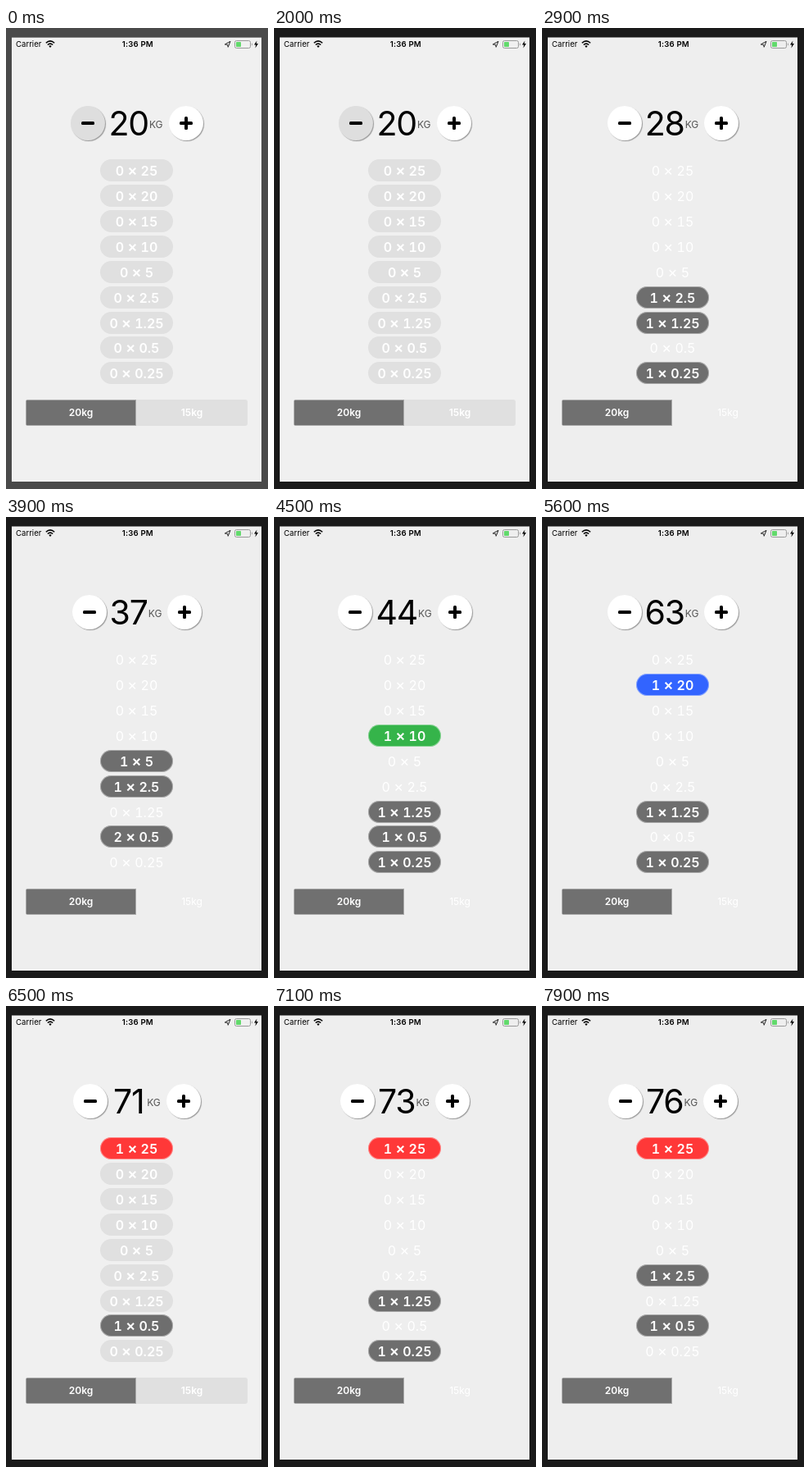
Animation of 320 by 562 pixels, one loop 8000 ms. Source, as an HTML page:

```html
<!DOCTYPE html>
<html lang="en">
<head>
<meta charset="utf-8">
<title>Barbell plate counter</title>
<style>
  html, body { margin: 0; width: 100%; height: 100%; overflow: hidden; }
  body { position: relative; background: #4a4a4a; font-family: Inter, Roboto, sans-serif; animation: frame 8s step-end infinite; }
  @keyframes frame { 0% { background: #4a4a4a; } 25%, 100% { background: #1a1a1a; } }
  #screen { position: absolute; left: 7px; top: 11px; width: 305px; height: 542px; background: #f0f0f0; box-shadow: inset 0 1px #858585; --off: #e0e0e0; --weight: 600; }
  #screen.faint { background: #eee; --off: transparent; --weight: 400; }
  #status { position: absolute; left: 0; top: 0; }
  #total { position: absolute; left: 0; top: 84px; width: 306px; height: 42px; display: flex; justify-content: center; align-items: center; }
  #weight { min-width: 43px; margin-left: 4px; font-size: 41px; line-height: 42px; letter-spacing: -1.2px; text-align: center; color: #000; }
  #unit { margin: 3px 7px 0 1px; font-size: 12px; color: #555; }
  .button { position: relative; flex: none; width: 42px; height: 42px; border-radius: 50%; background: #fff; box-shadow: 1px 1px 1px #999; }
  .button.disabled { background: #dedede; }
  .button::before, .plus::after { content: ""; position: absolute; left: 13px; top: 19px; width: 16px; height: 4px; border-radius: 1.5px; background: #000; }
  .plus::after { transform: rotate(90deg); }
  .plate { position: absolute; left: 108px; width: 89px; height: 27px; border-radius: 14px; background: var(--off); color: #fff; font: var(--weight) 16px/28px Inter, Roboto, sans-serif; font-variant-numeric: tabular-nums; text-align: center; white-space: pre; }
  .plate span { font-size: 1.15em; line-height: 0; }
  .plate.on { background: var(--on); color: var(--ink); font-weight: 600; box-shadow: inset 0 0 0 1px #fff6; }
  #bars { position: absolute; left: 17px; top: 442px; width: 271px; height: 32px; display: flex; border-radius: 3px; overflow: hidden; color: #fff; font-size: 12px; line-height: 32px; text-align: center; }
  #bars div { flex: 1; background: var(--off); font-weight: var(--weight); }
  #bars .chosen { flex: none; width: 135px; background: #707070; box-shadow: inset 0 0 0 1px #fff6; font-weight: 600; }
</style>
</head>
<body>
<div id="screen">
  <svg id="status" width="305" height="20" viewBox="7 11 305 20">
    <g font-family="Inter, Roboto, sans-serif" font-size="9.6">
      <text x="12" y="23.2">Carrier</text>
      <text x="160.8" y="23.2" text-anchor="middle" font-weight="600" letter-spacing=".2">1:36 PM</text>
    </g>
    <path d="M48.8 18.2Q54 13.6 59.2 18.2M50.8 20.5Q54 17.7 57.2 20.5" fill="none" stroke="#000" stroke-width="1.5"/>
    <path d="M52.3 22L54 24L55.7 22Q54 20.6 52.3 22Z"/>
    <path d="M267.3 20L274 16.3L271.2 23.3L270.6 20.3Z" fill="none" stroke="#222"/>
    <rect x="279.5" y="15.5" width="19" height="9" rx="2" fill="none" stroke="#999"/>
    <rect x="281" y="17" width="6" height="6" rx=".7" fill="#62d96c"/>
    <path d="M300 18.3Q302 20 300 21.7Z" fill="#999"/>
    <path d="M306.4 15.5L303 20.6H305.2L304.4 24.4L308 19.1H305.7Z"/>
  </svg>
  <div id="total">
    <div id="minus" class="button"></div>
    <span id="weight">20</span><span id="unit">KG</span>
    <div class="button plus"></div>
  </div>
  <div id="plates"></div>
  <div id="bars"><div class="chosen">20kg</div><div>15kg</div></div>
</div>
<script>
  const LOOP = 8000, TICK = 100, BAR = 20;
  const SIZES = [25, 20, 15, 10, 5, 2.5, 1.25, 0.5, 0.25];
  const COLORS = { 25: "#ff3838", 20: "#3264ff", 15: "#ffff00", 10: "#35b44a" };
  // [time, weight]: a held press that speeds up, then single taps
  const RAMP = [[0, 20], [2000, 20], [2900, 28], [3900, 37], [4300, 42], [4400, 42], [4900, 52], [6000, 70], [6400, 70]];
  const TAPS = [6500, 6700, 7000, 7200, 7700, 7900];

  const byId = id => document.getElementById(id);
  const screenBox = byId("screen");
  const pills = SIZES.map((size, i) => {
    const pill = document.createElement("div");
    pill.className = "plate";
    pill.style.top = 149.3 + i * 30.87 + "px";
    pill.style.setProperty("--on", COLORS[size] || "#6e6e6e");
    pill.style.setProperty("--ink", size === 15 ? "#5a5a5a" : "#fff");
    byId("plates").append(pill);
    return pill;
  });

  function weightAt(time) {
    const next = RAMP.findIndex(([at]) => at > time);
    if (next < 0) return 70 + TAPS.filter(at => at <= time).length;
    const [t0, w0] = RAMP[next - 1], [t1, w1] = RAMP[next];
    return Math.round(w0 + (w1 - w0) * (time - t0) / (t1 - t0));
  }

  function show(weight) {
    let side = (weight - BAR) / 2, lit = 0;
    SIZES.forEach((size, i) => {
      const count = Math.floor(side / size);
      side -= count * size;
      lit += count > 0;
      pills[i].innerHTML = `${count} <span>×</span> ${size}`;
      pills[i].classList.toggle("on", count > 0);
    });
    byId("weight").textContent = weight;
    byId("minus").classList.toggle("disabled", weight === BAR);
    screenBox.classList.toggle("faint", lit > 2);
  }

  let shown;
  function draw() {
    const time = performance.now() % LOOP;
    const weight = weightAt(Math.floor(time / TICK) * TICK);
    if (weight !== shown) show(shown = weight);
    requestAnimationFrame(draw);
  }
  draw();
</script>
</body>
</html>
```
